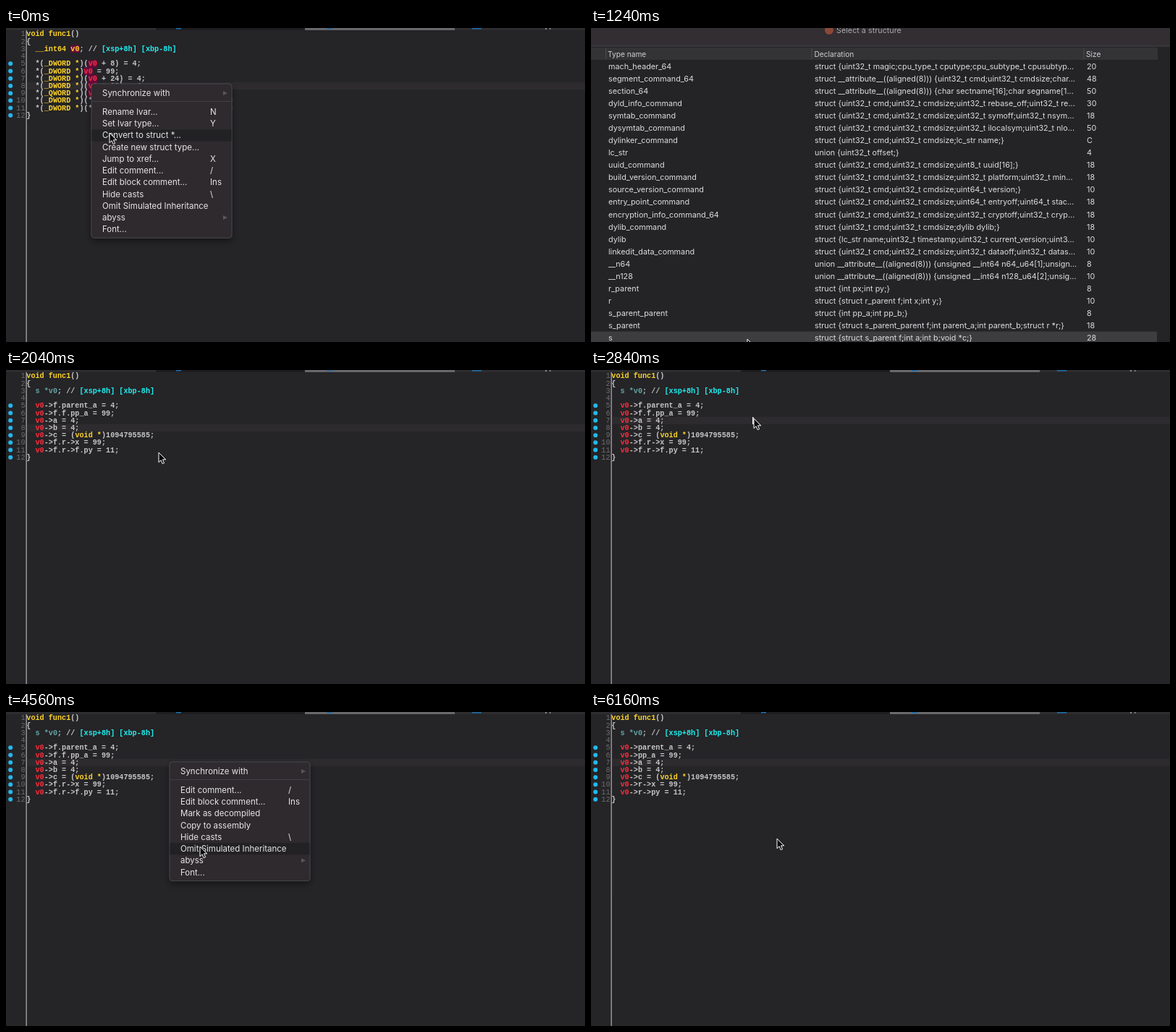
These frames come from a looping animation (800x434 px, 6.2 s). An HTML page:

```html
<!DOCTYPE html>
<html lang="en">
<head>
<meta charset="utf-8">
<title>Convert to struct</title>
<style>
  html, body { margin: 0; width: 100%; height: 100%; overflow: hidden; background: #252427; }
  svg { display: block; width: 800px; height: 434px; }
  text { white-space: pre; }
  .code { font: bold 10.17px "Liberation Mono", "Courier New", monospace; fill: #c6c5c7; }
  .ui { font: 10.8px Inter, "Liberation Sans", sans-serif; fill: #dddcde; }
  .menu { font: 11.5px Inter, "Liberation Sans", sans-serif; fill: #e6e5e7; }
</style>
</head>
<body>
<svg id="stage" viewBox="0 0 800 434"></svg>
<script>
const LOOP = 6200, CHAR = 6.102, LINE = 10.23, ROW = 17.045, ITEM = 16.22;
const YELLOW = '#fdd428', RED = '#ff2d3c', CYAN = '#1fefef', TEAL = '#62a5a5';
const stage = document.getElementById('stage');

function add(parent, tag, attrs = {}, content) {
  const node = document.createElementNS('http://www.w3.org/2000/svg', tag);
  for (const key in attrs) node.setAttribute(key, attrs[key]);
  if (content !== undefined) node.textContent = content;
  return parent.appendChild(node);
}
const group = (parent, attrs) => add(parent, 'g', attrs);
const rect = (parent, x, y, width, height, fill, more) =>
  add(parent, 'rect', { x, y, width, height, fill, ...more });
const label = (parent, x, y, content, more) => add(parent, 'text', { x, y, ...more }, content);
const show = (node, opacity) => {
  node.setAttribute('opacity', opacity);
  node.style.display = opacity > 0 ? '' : 'none';
};
const clamp = v => Math.max(0, Math.min(1, v));
const progress = (t, from, to) => clamp((t - from) / (to - from));

const shadow = add(add(stage, 'defs'), 'filter', { id: 'shadow', x: '-20%', y: '-20%', width: '140%', height: '140%' });
add(shadow, 'feDropShadow', { dx: 0, dy: 4, stdDeviation: 5, 'flood-color': '#000', 'flood-opacity': .45 });

// Editor
rect(stage, 0, 0, 800, 434, '#252427');
const lineMark = rect(stage, 29, 0, 771, LINE, '#2d2b2e');
rect(stage, 0, 0, 800, 3, '#2e2d30');
rect(stage, 207, 0, 206, 3, '#1d1c1f');
rect(stage, 413, 0, 207, 3, '#69686b');
for (const [x, w] of [[235, 7], [443, 8], [644, 13]]) rect(stage, x, 0, w, 1.6, '#1c6ca8');
rect(stage, 745, 0, 2, 2, '#8a898b');
rect(stage, 751, 0, 1.5, 2, '#8a898b');

const gutter = group(stage, { class: 'code' });
for (let n = 0; n < 12; n++) {
  label(gutter, 26.5, 11.4 + n * LINE, n + 1, { 'text-anchor': 'end', fill: '#6d6c6f', 'font-weight': 'normal' });
  if (n > 3) add(gutter, 'circle', { cx: 6.2, cy: 8.3 + n * LINE, r: 3, fill: '#22b9ee' });
}

const TOKENS = /(\[.*\])|(s \*v0)|(void func1|__int64|_[DQ]WORD \*|void \*)|(v0)|([^\[_sv]+|.)/g;
const TOKEN_FILLS = [CYAN, TEAL, YELLOW, RED];

function codeView(declaration, body, marked) {
  const view = group(stage, { class: 'code' });
  ['void func1()', '{', '  ' + declaration + '; // [xsp+8h] [xbp-8h]', '',
    ...body.map(s => '  ' + s), '}'].forEach((source, n) => {
    const y = 11.4 + n * LINE;
    if (marked) for (const m of source.matchAll(/v0/g))
      rect(view, 28.3 + m.index * CHAR, y - 8, 2 * CHAR, LINE, '#6c0a3d');
    const line = label(view, 28.3, y, '');
    for (const m of source.matchAll(TOKENS)) {
      const kind = m.slice(1).findIndex(Boolean);
      const fill = marked && n === 2 && kind === 3 ? YELLOW : TOKEN_FILLS[kind];
      add(line, 'tspan', fill ? { fill } : {}, m[0]);
    }
  });
  return view;
}
const rawCode = codeView('__int64 v0', [
  '*(_DWORD *)(v0 + 8) = 4;',
  '*(_DWORD *)v0 = 99;',
  '*(_DWORD *)(v0 + 24) = 4;',
  '*(_DWORD *)(v0 + 28) = 4;',
  '*(_QWORD *)(v0 + 32) = 1094795585LL;',
  '*(_DWORD *)(*(_QWORD *)(v0 + 16) + 8LL) = 99;',
  '*(_DWORD *)(*(_QWORD *)(v0 + 16) + 4LL) = 11;'], true);
const members = ['f.parent_a = 4;', 'f.f.pp_a = 99;', 'a = 4;', 'b = 4;',
  'c = (void *)1094795585;', 'f.r->x = 99;', 'f.r->f.py = 11;'].map(s => 'v0->' + s);
const structCode = codeView('s *v0', members);
const flatCode = codeView('s *v0', members.map(s => s.replace(/\bf\./g, '')));

rect(stage, 27.6, 3, 1, 431, '#cfced0');
const caret = rect(stage, 223, 65, 1.6, 10, '#f2f2f2');

// Context menus
function contextMenu(x, y, items) {
  const view = group(stage, { class: 'menu', transform: `translate(${x} ${y})` });
  const height = 39 + (items.length - 1) * ITEM + 12;
  rect(view, 0, 0, 194, height, '#2d2c2f', { rx: 4, stroke: '#48474a', filter: 'url(#shadow)' });
  const hover = rect(view, .5, 0, 193, ITEM, '#222124');
  rect(view, 1, 24, 192, 1, '#414043');
  const arrow = cy => add(view, 'path', { d: `M182 ${cy - 3}l6 3l-6 3z`, fill: '#59585b' });
  label(view, 15, 17, 'Synchronize with');
  arrow(13);
  items.forEach(([name, key], i) => {
    const cy = 39 + i * ITEM;
    label(view, 15, cy + 4, name);
    if (key === '>') arrow(cy);
    else if (key) label(view, 164, cy + 4, key);
  });
  return (opacity, cursorY) => {
    show(view, opacity);
    const i = Math.round((cursorY + 3 - y - 39) / ITEM);
    hover.setAttribute('y', 39 + (i - .5) * ITEM);
    show(hover, i >= 0 && i < items.length ? 1 : 0);
  };
}
const comments = [['Edit comment...', '/'], ['Edit block comment...', 'Ins']];
const tail = [['Hide casts', '\\'], ['Omit Simulated Inheritance'], ['abyss', '>'], ['Font...']];
const variableMenu = contextMenu(118, 77, [['Rename lvar...', 'N'], ['Set lvar type...', 'Y'],
  ['Convert to struct *...'], ['Create new struct type...'], ['Jump to xref...', 'X'], ...comments, ...tail]);
const lineMenu = contextMenu(226, 69, [...comments, ['Mark as decompiled'], ['Copy to assembly'], ...tail]);

// Structure chooser
const cmd = 'struct {uint32_t cmd;uint32_t cmdsize;';
const aligned = ' __attribute__((aligned(8))) {';
const types = `1|mach_header_64|struct {uint32_t magic;cpu_type_t cputype;cpu_subtype_t cpusubtyp...|20
6|segment_command_64|struct${aligned}uint32_t cmd;uint32_t cmdsize;char...|48
9|section_64|struct${aligned}char sectname[16];char segname[1...|50
10|dyld_info_command|${cmd}uint32_t rebase_off;uint32_t re...|30
11|symtab_command|${cmd}uint32_t symoff;uint32_t nsym...|18
12|dysymtab_command|${cmd}uint32_t ilocalsym;uint32_t nlo...|50
13|dylinker_command|${cmd}lc_str name;}|C
14|lc_str|union {uint32_t offset;}|4
15|uuid_command|${cmd}uint8_t uuid[16];}|18
17|build_version_command|${cmd}uint32_t platform;uint32_t min...|18
18|source_version_command|${cmd}uint64_t version;}|10
19|entry_point_command|${cmd}uint64_t entryoff;uint64_t stac...|18
20|encryption_info_command_64|${cmd}uint32_t cryptoff;uint32_t cryp...|18
21|dylib_command|${cmd}dylib dylib;}|18
22|dylib|struct {lc_str name;uint32_t timestamp;uint32_t current_version;uint3...|10
23|linkedit_data_command|${cmd}uint32_t dataoff;uint32_t datas...|10
24|__n64|union${aligned}unsigned __int64 n64_u64[1];unsign...|8
25|__n128|union${aligned}unsigned __int64 n128_u64[2];unsig...|10
26|r_parent|struct {int px;int py;}|8
27|r|struct {struct r_parent f;int x;int y;}|10
28|s_parent_parent|struct {int pp_a;int pp_b;}|8
29|s_parent|struct {struct s_parent_parent f;int parent_a;int parent_b;struct r *r;}|18
30|s|struct {struct s_parent f;int a;int b;void *c;}|28`.split('\n').map(s => s.split('|'));

const dialog = group(stage, { class: 'ui' });
rect(dialog, -60, -8, 876, 560, '#302f32', { rx: 6, stroke: '#525154', filter: 'url(#shadow)' });
[[-48, '#d8403c'], [-31, '#5a595c'], [-14, '#2c8a6a']].forEach(([cx, fill]) =>
  add(dialog, 'circle', { cx, cy: 2, r: 4.5, fill }));
add(dialog, 'circle', { cx: 329, cy: 3, r: 6, fill: '#8a4836' });
label(dialog, 339, 6.5, 'Select a structure', { fill: '#a9a8ab' });
rect(dialog, -48, 25, 851, 480, '#242326', { stroke: '#48474a' });
rect(dialog, -47, 27, 830, 17, '#333235');
for (const x of [20, 304.5, 680.5]) rect(dialog, x, 28, 1, 15, '#4c4b4e');
[[-41, '#'], [23, 'Type name'], [308.5, 'Declaration'], [684, 'Size']].forEach(([x, name]) =>
  label(dialog, x, 39.5, name, { 'font-size': '10.2px', style: 'font-size:10.2px', fill: '#d0cfd2' }));
types.forEach(([index, name, declaration, size], i) => {
  const cy = 53 + i * ROW;
  if (name === 's') rect(dialog, -47, cy - 8.5, 829, ROW, '#3d3c3f');
  rect(dialog, -42.5, cy - 6, 13.5, 12, '#d7dde2');
  rect(dialog, -42.5, cy - 6, 13.5, 3.5, '#3578b8');
  rect(dialog, -40, cy, 4, 4, '#c65345');
  rect(dialog, -35, cy - 1, 4, 4, '#5a83ae');
  [[-24, index], [24, name], [309, declaration], [685, size]].forEach(([x, s]) => label(dialog, x, cy + 4, s));
});

const cursor = add(stage, 'path', {
  d: 'M0 0V13.6L3.1 10.7L5.2 15.6L7.6 14.6L5.5 9.8H9.8Z',
  fill: '#0a0a0a', stroke: '#fff', 'stroke-width': 1
});
const cursorKeys = [
  [0, 143, 145], [60, 143, 145], [220, 131, 406], [260, 131, 406], [600, 240, 424], [840, 240, 424],
  [1240, 216, 430], [1440, 216, 430], [2000, 211, 114], [2040, 211, 114], [2360, 230, 96],
  [2640, 225, 67], [3040, 225, 67], [3320, 234, 92], [3920, 265, 179], [4280, 268, 186],
  [4640, 268, 186], [5040, 262, 180], [5640, 257, 175], [LOOP, 257, 175]];

function cursorAt(t) {
  const i = cursorKeys.findIndex(key => key[0] > t);
  const [t0, x0, y0] = cursorKeys[i - 1], [t1, x1, y1] = cursorKeys[i];
  const p = progress(t, t0, t1), e = p * p * (3 - 2 * p);
  return [x0 + (x1 - x0) * e, y0 + (y1 - y0) * e];
}

function render(t) {
  const [x, y] = cursorAt(t);
  cursor.setAttribute('transform', `translate(${x} ${y})`);

  show(rawCode, t < 1480 ? 1 : 0);
  show(structCode, t >= 1480 && t < 4800 ? 1 : 0);
  show(flatCode, t >= 4800 ? 1 : 0);
  lineMark.setAttribute('y', 3.3 + (t < 2640 ? 7 : 6) * LINE);
  show(caret, t >= 2680 && t < 2920 ? 1 : 0);

  variableMenu(1 - progress(t, 80, 200), Math.min(y, 145));
  lineMenu(t < 2920 ? 0 : 1 - progress(t, 4620, 4780), y);

  // The window grows around its centre and fades away in place.
  const p = progress(t, 200, 400);
  const scale = .633 + .367 * (1 - (1 - p) ** 2);
  dialog.setAttribute('transform', `translate(377 287) scale(${scale}) translate(-377 -287)`);
  show(dialog, t < 200 ? 0 : t < 1400 ? clamp(.72 + (t - 200) / 300) : 1 - progress(t, 1400, 1560));
}

function tick() {
  render(performance.now() % LOOP);
  requestAnimationFrame(tick);
}
tick();
</script>
</body>
</html>
```
